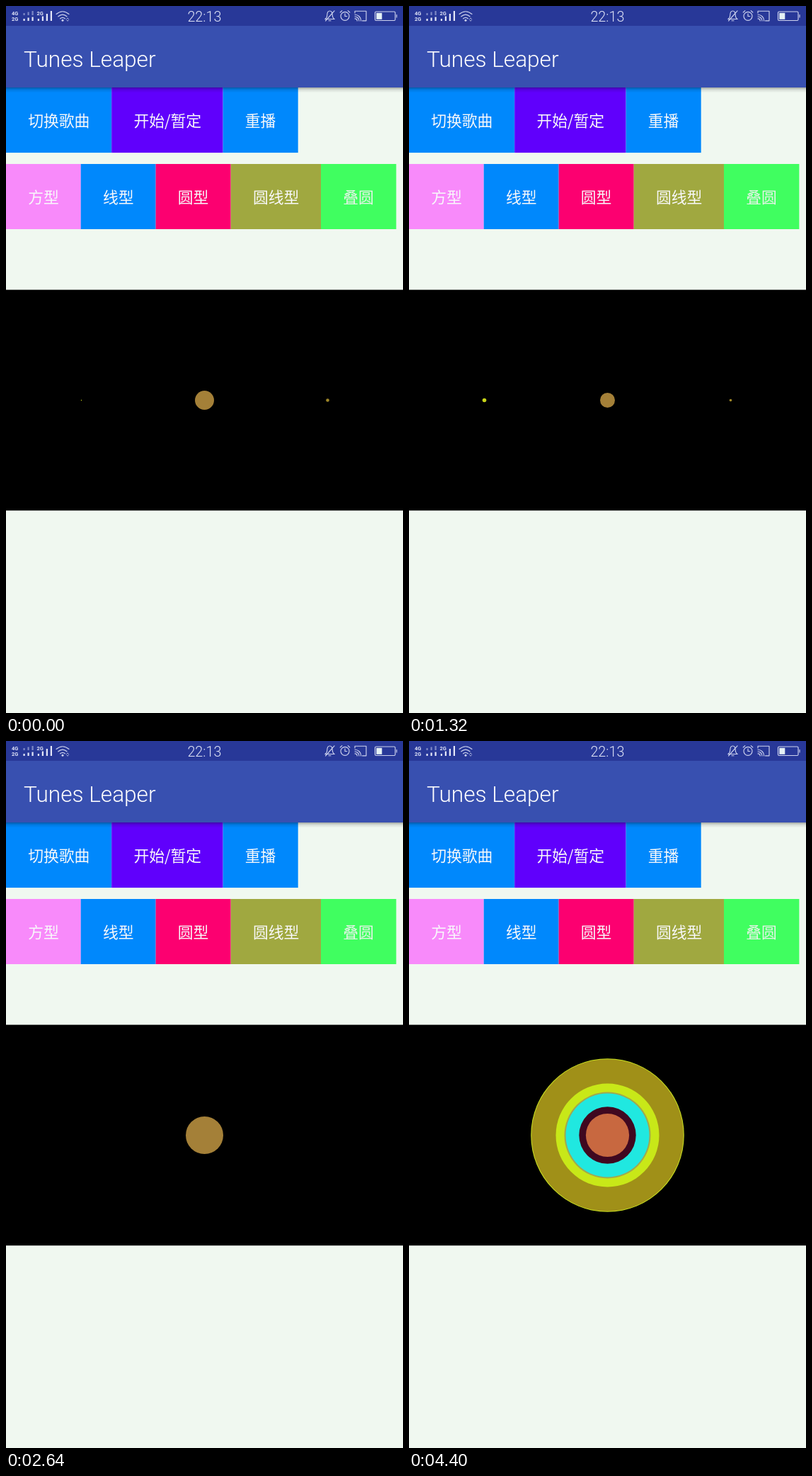
An HTML page that plays this animation: 561x998 px, repeating every 4.84 s.

```html
<!DOCTYPE html>
<html lang="zh-CN">
<head>
<meta charset="utf-8">
<title>Tunes Leaper</title>
<style>
  html, body { margin: 0; width: 100%; height: 100%; overflow: hidden; background: #f0f8f0; }
  svg { display: block; width: 561px; height: 998px; }
  .label { font: 400 21.8px "Noto Sans CJK SC", "Noto Sans CJK", sans-serif; fill: #f8f8fa; }
  .title { font: 300 31.6px Roboto, sans-serif; fill: #fff; }
  .clock { font: 300 19.8px Roboto, sans-serif; fill: #dfe3f6; }
  .net { font: 700 7.4px Roboto, sans-serif; fill: #dfe3f6; }
  .line { fill: none; stroke: #ced3ee; stroke-width: 1.15; stroke-linecap: round; stroke-linejoin: round; }
</style>
</head>
<body>
<svg viewBox="0 0 561 998">
  <defs>
    <linearGradient id="shade" x2="0" y2="1">
      <stop offset="0" stop-color="#000" stop-opacity=".32"/>
      <stop offset=".45" stop-color="#000" stop-opacity=".1"/>
      <stop offset="1" stop-color="#000" stop-opacity="0"/>
    </linearGradient>
  </defs>
  <rect width="561" height="998" fill="#f0f8f0"/>
  <g id="buttons"></g>
  <rect y="115" width="561" height="7.5" fill="url(#shade)"/>
  <rect y="28" width="561" height="87" fill="#3850b0"/>
  <rect width="561" height="28" fill="#283898"/>
  <text class="title" x="25" y="85.5">Tunes Leaper</text>

  <text class="net" x="8" y="13.4">4G</text>
  <text class="net" x="8" y="21.2">2G</text>
  <text class="net" x="43.5" y="12.6">2G</text>
  <g id="bars"></g>
  <g class="line">
    <path d="M71 11.5Q80 4 89 11.5M73.8 14.8Q80 9.4 86 14.8M76.6 17.8Q80 15 83.4 17.8"/>
    <path d="M85.8 18.4l1.3-1.5 1.3 1.5M85.8 19.8l1.3 1.5 1.3-1.5" stroke-width=".8"/>
  </g>
  <circle cx="80" cy="20.2" r="1.5" fill="#ced3ee"/>
  <text class="clock" x="256.4" y="22">22:13</text>

  <g class="line">
    <path d="M450.8 18.5Q453.6 17 453.8 12.5Q454 7 457.5 7Q461 7 461.2 12.5Q461.4 17 464.2 18.5ZM456 20.7h3M464 6.8L451.5 21"/>
    <circle cx="479" cy="14.3" r="6"/>
    <path d="M479 10.8v3.7h2.8M472.2 9l2.6-2.4M485.8 9l-2.6-2.4"/>
    <path d="M493 10V7.2H509V20.8H503.5M493 12.2a8.7 8.7 0 0 1 8.7 8.7M493 15a6 6 0 0 1 6 6M493 17.8a3.2 3.2 0 0 1 3.2 3.2"/>
    <rect x="521.5" y="8" width="28.5" height="12.5" rx="1.5"/>
    <path d="M552 12.5v3.5"/>
  </g>
  <rect x="523.3" y="9.8" width="8" height="9" fill="#e4f0f4"/>

  <rect y="400.6" width="561" height="311.6" fill="#000"/>
  <g id="stage"></g>
</svg>
<script>
const NS = "http://www.w3.org/2000/svg";
const $ = id => document.getElementById(id);

function add(parent, tag, attrs, text) {
  const el = document.createElementNS(NS, tag);
  for (const key in attrs) el.setAttribute(key, attrs[key]);
  if (text) el.textContent = text;
  parent.append(el);
  return el;
}

function buttonRow(y, height, items) {
  let x = 0;
  for (const [text, right, fill, ink = "#f8f8fa"] of items) {
    add($("buttons"), "rect", { x, y, width: right - x, height, fill });
    add($("buttons"), "text", { class: "label", x: x + 31.2, y: y + 55.4, style: `fill:${ink}` }, text);
    x = right;
  }
}

buttonRow(115, 92.1, [
  ["切换歌曲", 149.2, "#0088fc"],
  ["开始/暂定", 306.6, "#6000fc"],
  ["重播", 412.7, "#0088fc"]
]);
buttonRow(223, 92, [
  ["方型", 105.7, "#f88afa"],
  ["线型", 211.6, "#0088fc"],
  ["圆型", 317.7, "#fc0070"],
  ["圆线型", 445, "#a0a840"],
  ["叠圆", 551.4, "#40fe60", "#e6f4e8"]
]);

function signal(x, step, bottom, heights, fill) {
  heights.forEach((h, i) =>
    add($("bars"), "rect", { x: x + i * step, y: bottom - h, width: 2.2, height: h, fill }));
}
signal(24.5, 6, 13, [3, 4.5, 6], "#7d88c6");
signal(24.5, 6, 21, [3, 4.5, 5.5], "#e4e7f8");
signal(44.8, 6, 21, [3, 6.5, 10, 14], "#e4e7f8");

// Each beat holds a pose; a circle is [x, radius, colour].
const BEAT = 440, LOOP = 4840, CY = 556.5;
const LEFT = 106.5, MID = 280.5, RIGHT = 454.5;
const LIME = "#c8d418", TAN = "#a48038", OLIVE = "#a08828";

const dots = (a, b, c, mid = TAN) => [[LEFT, a, LIME], [MID, b, mid], [RIGHT, c, OLIVE]];
const rings = [
  [MID, 108.3, "#c8e020"], [MID, 107.3, "#a09018"],
  [MID, 73, "#c8e818"], [MID, 61, "#a0a850"], [MID, 59, "#20e8e0"],
  [MID, 40.2, "#400820"], [MID, 30.6, "#c86840"]
];
const poses = [
  dots(.7, 13.5, 2.3),
  dots(16, 5, 5, OLIVE),
  dots(3, 12.5, 3),
  dots(2.8, 10.5, 1.8),
  dots(4, 17.5, 3),
  [],
  [[MID, 26.5, TAN]],
  [],
  [],
  [[MID, .9, "#909090"]],
  rings
];

const groups = poses.map(pose => {
  const g = add($("stage"), "g", { visibility: "hidden" });
  for (const [cx, r, fill] of pose) add(g, "circle", { cx, cy: CY, r, fill });
  return g;
});

let shown = -1;
const start = performance.now();
function draw(now) {
  const beat = Math.floor(Math.max(0, now - start) % LOOP / BEAT);
  if (beat !== shown) {
    groups.forEach((g, i) => g.setAttribute("visibility", i === beat ? "visible" : "hidden"));
    shown = beat;
  }
  requestAnimationFrame(draw);
}
draw(start);
</script>
</body>
</html>
```
